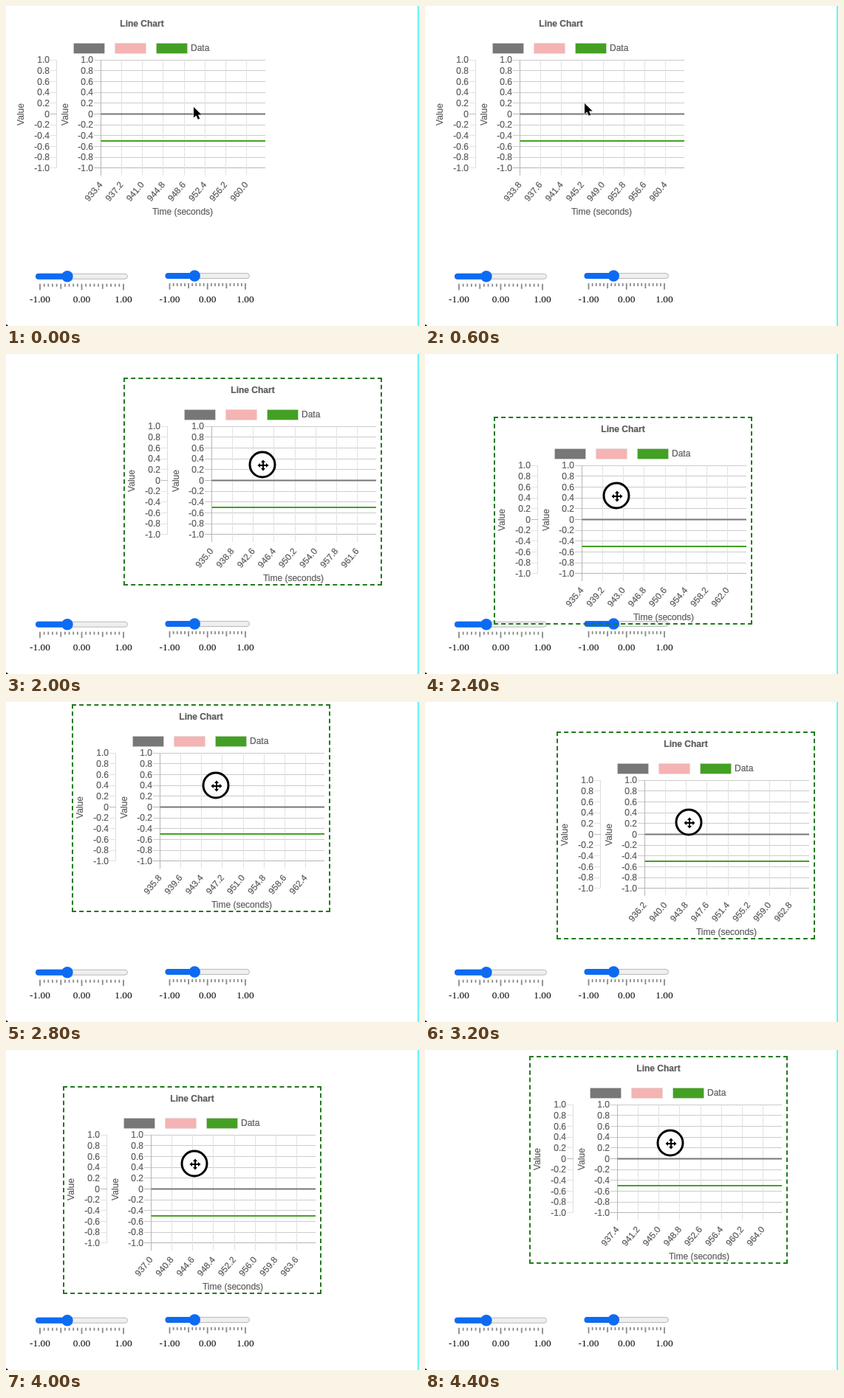
Animation, 559 px wide and 434 px high, one loop 4600 ms. Source, as an HTML page:

```html
<!DOCTYPE html>
<html lang="en">
<head>
<meta charset="utf-8">
<title>Draggable line chart</title>
<style>
  html, body { margin: 0; width: 100%; height: 100%; overflow: hidden; background: #fff; }
  svg { display: block; position: absolute; left: 0; top: 0; }
  #frame { position: absolute; left: 0; top: 0; box-sizing: border-box; width: 350px; height: 282px; border: 2px dashed #227a1c; }
  #chart text { font: 12px "Liberation Sans", Arial, sans-serif; fill: #5c5c5c; stroke: #5c5c5c; stroke-width: .2; }
  #chart .title { font-weight: bold; }
  .slider text { font: 13.33px "Liberation Serif", Times, serif; fill: #000; text-anchor: middle; }
  .mid { text-anchor: middle; }
  .end { text-anchor: end; }
</style>
</head>
<body>
<svg width="559" height="434">
  <rect x="557" width="2" height="434" fill="#6ff2f6"/>
  <circle cx="0" cy="435" r="3" fill="#111"/>
  <g id="sliders"></g>
  <g id="chart"></g>
</svg>
<div id="frame"></div>
<svg width="559" height="434">
  <g id="pointer">
    <circle id="ring" cx="-1" cy="-1" r="17" fill="#fff" stroke="#000" stroke-width="3"/>
    <path id="arrow" d="M0 0V14.5L3.4 11.4L5.8 16.8L8.3 15.7L6 10.5H10.6Z" fill="#000" stroke="#fff" stroke-width="1" paint-order="stroke"/>
    <path id="move" d="M0-7.5L3-4H1V-1H4V-3L7.5 0L4 3V1H1V4H3L0 7.5L-3 4H-1V1H-4V3L-7.5 0L-4-3V-1H-1V-4H-3Z"
      fill="#000" stroke="#fff" stroke-width="2" paint-order="stroke"/>
  </g>
</svg>
<script>
const LOOP = 4600, STEP = 200;
const DRAG_FROM = 1000, CIRCLE_FROM = 1800;
const LEAD = 50; // ms by which the chart trails the pointer
const HOME = { x: 9, y: 7 };
const GRAB = { x: 180, y: 115 };
const ORBIT = { x: 125, y: 44, rx: 55, ry: 40 };

// time, x, y
const approach = [[200, 254, 137], [400, 236, 113], [600, 216, 132], [1000, 189, 122], [1200, 198, 122]];
const circling = [
  [1800, 84, 9], [2000, 159, 32], [2200, 184, 62], [2400, 93, 85], [2800, 89, 3],
  [3200, 178, 40], [3600, 110, 83], [4000, 77, 49], [4400, 141, 8], [4600, 176, 35]
];

const $ = id => document.getElementById(id);

// Linear interpolation over rows of [time, a, b], held at both ends.
function sample(track, t) {
  const next = track.findIndex(row => row[0] > t);
  if (next === 0) return track[0].slice(1);
  if (next < 0) return track[track.length - 1].slice(1);
  const from = track[next - 1], to = track[next];
  const k = (t - from[0]) / (to[0] - from[0]);
  return [1, 2].map(i => from[i] + (to[i] - from[i]) * k);
}

// Rewrites points as clockwise angle and relative radius around the orbit's centre.
let lastAngle = -Math.PI;
const polar = circling.map(([t, x, y]) => {
  const dx = (x - ORBIT.x) / ORBIT.rx, dy = (y - ORBIT.y) / ORBIT.ry;
  let angle = Math.atan2(dy, dx);
  while (angle < lastAngle) angle += 2 * Math.PI;
  lastAngle = angle;
  return [t, angle, Math.hypot(dx, dy)];
});

function orbitAt(t) {
  const [angle, radius] = sample(polar, t);
  return {
    x: ORBIT.x + ORBIT.rx * radius * Math.cos(angle),
    y: ORBIT.y + ORBIT.ry * radius * Math.sin(angle)
  };
}

function poseAt(t) {
  if (t >= CIRCLE_FROM) {
    const ahead = orbitAt(t + LEAD);
    return { chart: orbitAt(t), pointer: { x: ahead.x + GRAB.x, y: ahead.y + GRAB.y } };
  }
  const [x, y] = sample(approach, t);
  return { chart: t < DRAG_FROM ? HOME : { x: x - GRAB.x, y: y - GRAB.y }, pointer: { x, y } };
}

// The time axis starts slightly ahead and settles to one second per second.
const axisStart = t => 933 + t / 1000 + .4 * Math.exp(-t / 900);

function add(parent, tag, attrs, text) {
  const el = document.createElementNS("http://www.w3.org/2000/svg", tag);
  for (const key in attrs) el.setAttribute(key, attrs[key]);
  if (text !== undefined) el.textContent = text;
  parent.appendChild(el);
  return el;
}

function line(parent, x1, y1, x2, y2, stroke, width = 1) {
  return add(parent, "line", { x1, y1, x2, y2, stroke, "stroke-width": width });
}

function buildSlider(left, right, knob, y, first, last) {
  const g = add($("sliders"), "g", { class: "slider" });
  add(g, "rect", { x: left + .5, y: y - 3.5, width: right - left - 1, height: 7, rx: 3.5, fill: "#efefef", stroke: "#b8b8b8" });
  add(g, "rect", { x: left, y: y - 4, width: knob - left, height: 8, rx: 4, fill: "#0d6bf2" });
  add(g, "circle", { cx: knob, cy: y, r: 7.7, fill: "#0d6bf2" });
  for (let i = 0; i <= 20; i++) {
    const x = first + (last - first) * i / 20;
    line(g, x, y + 10, x, y + (i % 10 === 0 ? 18.5 : i % 5 === 0 ? 17 : 14), "#8a8a8a", 1.8);
  }
  ["-1.00", "0.00", "1.00"].forEach((label, i) =>
    add(g, "text", { x: first + (last - first) * i / 2, y: y + 35.5 }, label));
}

function buildChart() {
  const g = $("chart");
  const top = 73.3, gap = 14.65, bottom = top + 10 * gap;
  const left = 128.5, right = 351, column = 28.15;
  const crisp = v => Math.floor(v) + .5;

  add(g, "text", { x: 184, y: 28, class: "title mid" }, "Line Chart");
  ["#777", "#f5b3b3", "#43a024"].forEach((fill, i) =>
    add(g, "rect", { x: 91.5 + i * 56, y: 50.5, width: 42, height: 14, fill, stroke: "#ddd", "stroke-opacity": .5 }));
  add(g, "text", { x: 250, y: 61 }, "Data");

  line(g, 68.5, top, 68.5, bottom, "#ddd");
  for (let i = 0; i <= 10; i++) {
    const y = top + i * gap, row = crisp(y);
    const label = i === 5 ? "0" : (1 - i / 5).toFixed(1);
    line(g, 60, row, 69, row, i === 5 ? "#bbb" : "#e2e2e2");
    line(g, 119, row, right, row, i === 5 || i === 10 ? "#b5b5b5" : "#cbcbcb");
    for (const x of [59, 118]) add(g, "text", { x, y: y + 4, class: "end" }, label);
  }
  for (const x of [20, 80])
    add(g, "text", { transform: `translate(${x + 4} 147) rotate(-90)`, class: "mid" }, "Value");

  const labels = [];
  for (let i = 0; i < 8; i++) {
    const x = left + i * column;
    line(g, crisp(x), top, crisp(x), 230, i ? "#e2e2e2" : "#b5b5b5");
    labels.push(add(g, "text", { transform: `translate(${x - .5} 240) rotate(-50)`, y: 4.2, class: "end" }));
  }
  add(g, "text", { x: 239, y: 283, class: "mid" }, "Time (seconds)");

  line(g, left, 146.6, right, 146.6, "#777", 2);
  line(g, left, 183, right, 183, "#43a024", 2.2);
  return labels;
}

const show = (el, on) => el.style.visibility = on ? "visible" : "hidden";
const place = (el, x, y) => el.style.transform = `translate(${Math.round(x)}px, ${Math.round(y)}px)`;

buildSlider(40, 165, 83, 366.7, 46, 159);
buildSlider(215.5, 330, 255.3, 366, 221.5, 324);
const labels = buildChart();

function draw(now) {
  const t = Math.floor(now % LOOP / STEP) * STEP;
  const { chart, pointer } = poseAt(t);
  const dragging = t >= DRAG_FROM;
  place($("chart"), chart.x - HOME.x, chart.y - HOME.y);
  place($("frame"), chart.x, chart.y);
  place($("pointer"), pointer.x, pointer.y);
  labels.forEach((el, i) => el.textContent = (axisStart(t) + 3.8 * i).toFixed(1));
  show($("frame"), dragging);
  show($("move"), dragging);
  show($("arrow"), !dragging);
  show($("ring"), t >= CIRCLE_FROM);
}

const began = performance.now();
function tick() {
  draw(performance.now() - began);
  requestAnimationFrame(tick);
}
tick();
</script>
</body>
</html>
```
